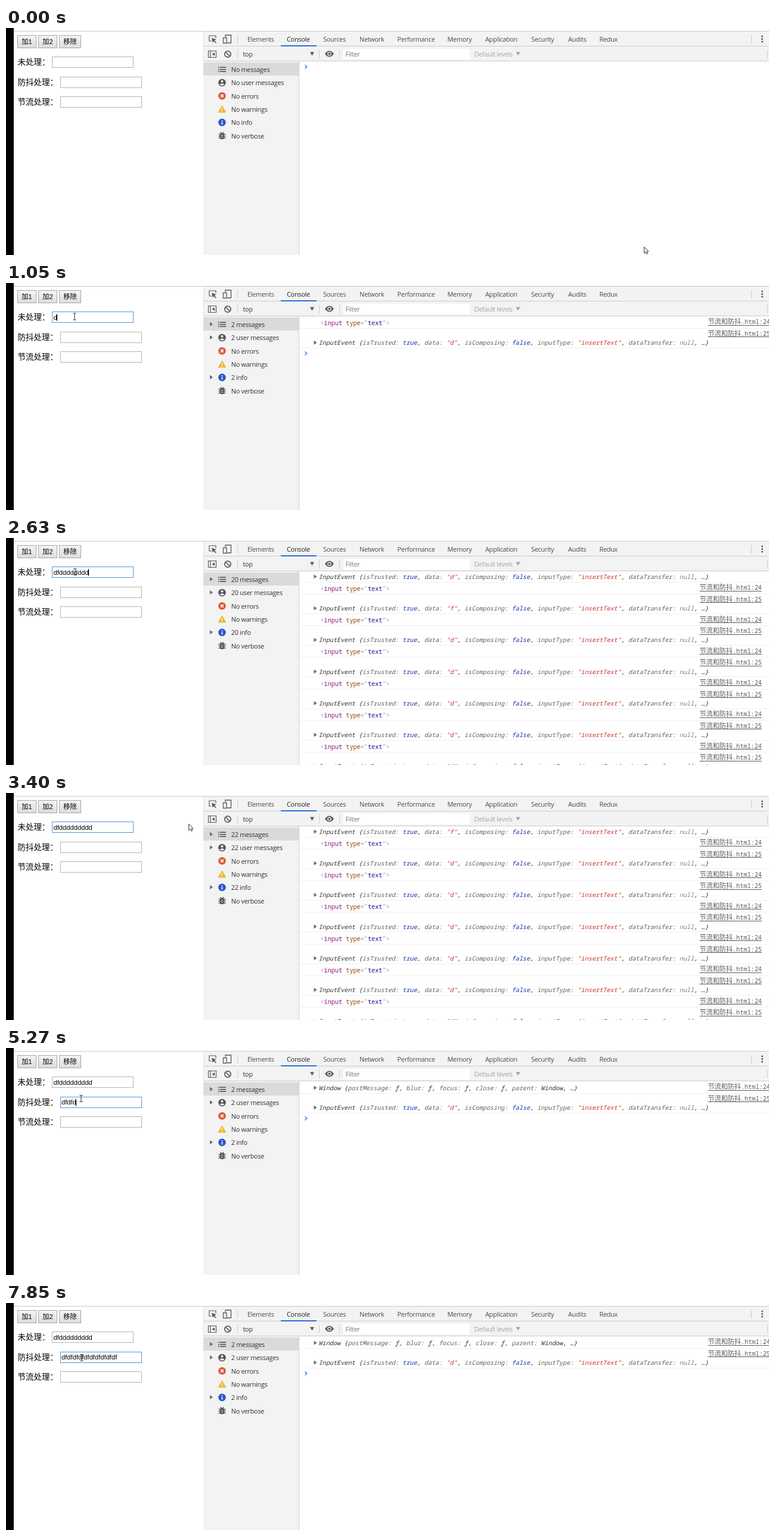
Recreate the animation shown at these times as an HTML page with a canvas. Size 1280x382 px, loop 8 s.

```html
<!DOCTYPE html>
<html lang="zh">
<head>
<meta charset="utf-8">
<style>
  html, body { margin: 0; width: 100%; height: 100%; overflow: hidden; background: #fff; }
  canvas { display: block; }
</style>
</head>
<body>
<canvas id="stage" width="1280" height="382"></canvas>
<script>
const ctx = document.getElementById('stage').getContext('2d');
const LOOP = 8000, PITCH = 53.25;
const UI = '10.9px "Open Sans", "Noto Sans", sans-serif';
const MONO = '10.2px "Noto Sans Mono", monospace';
const HAN = '"Noto Sans CJK SC", "Noto Sans CJK", sans-serif';
const ARIAL = '11.2px "Liberation Sans", ' + HAN;

const TYPED = ['dfddddddddd', 'df'.repeat(10)];
const KEYS = [
  [1040, 1200, 1350, 1520, 1700, 2000, 2300, 2400, 2490, 2590, 2760],
  Array.from({ length: 20 }, (_, i) => 4690 + i * 135)
];
const FOCUS = [[850, 3700], [4540, LOOP]];
const CLEAR = 3700;
const FIELDS = [[77.5, 48.5], [91, 82], [91, 115]];
const MOUSE = [
  [70, 1070, 368], [800, 115, 56.5], [3000, 116, 57], [3600, 372, 50],
  [3945, 372, 50], [4480, 126, 85], [5600, 126, 85], [6200, 127, 92]
];

function rect(x, y, w, h, color) {
  ctx.fillStyle = color;
  ctx.fillRect(x, y, w, h);
}

function frame(x, y, w, h, color) {
  ctx.strokeStyle = color;
  ctx.lineWidth = 1;
  ctx.strokeRect(x, y, w, h);
}

// Draws text and returns the x where it ends.
function text(s, x, y, font = UI, color = '#303030') {
  ctx.font = font;
  ctx.letterSpacing = font === UI ? '-0.27px' : '0px';
  ctx.fillStyle = color;
  ctx.fillText(s, x, y);
  return x + ctx.measureText(s).width;
}

function shape(d, x, y, fill, stroke, width = 1) {
  const path = new Path2D(d);
  ctx.save();
  ctx.translate(x, y);
  if (fill) { ctx.fillStyle = fill; ctx.fill(path); }
  if (stroke) { ctx.strokeStyle = stroke; ctx.lineWidth = width; ctx.stroke(path); }
  ctx.restore();
}

function disc(x, y, r, color) {
  ctx.fillStyle = color;
  ctx.beginPath();
  ctx.arc(x, y, r, 0, Math.PI * 2);
  ctx.fill();
}

const rightArrow = (x, y) => shape('M0-3.5L5.2 0L0 3.5Z', x, y, '#6e6e6e');
const downArrow = (x, y, color) => shape('M0 0H7L3.5 6Z', x, y, color);

function mouseAt(t) {
  const next = MOUSE.findIndex(k => k[0] > t);
  if (next === 0) return MOUSE[0].slice(1);
  if (next < 0) return MOUSE.at(-1).slice(1);
  const [t0, x0, y0] = MOUSE[next - 1], [t1, x1, y1] = MOUSE[next];
  const u = (t - t0) / (t1 - t0), s = u * u * (3 - 2 * u);
  return [x0 + (x1 - x0) * s, y0 + (y1 - y0) * s];
}

function drawPage(t, counts) {
  rect(0, 0, 1280, 382, '#fff');
  rect(13, 5, 1267, 1, '#cbcbcb');
  rect(0, 0, 13, 382, '#000');

  [['加1', 19.5, 31], ['加2', 54.5, 31], ['移除', 89.5, 36]].forEach(([label, x, w]) => {
    const shade = ctx.createLinearGradient(0, 12, 0, 34);
    shade.addColorStop(0, '#f5f5f5');
    shade.addColorStop(1, '#dcdcdc');
    rect(x, 12.5, w, 21, shade);
    frame(x, 12.5, w, 21, '#a8a8a8');
    ctx.textAlign = 'center';
    text(label, x + w / 2, 27.3, ARIAL, '#000');
    ctx.textAlign = 'left';
  });

  ['未处理：', '防抖处理：', '节流处理：'].forEach((label, i) => {
    const [x, y] = FIELDS[i];
    text(label, 19.5, y + 13.5, '13.5px ' + HAN, '#000');
    const focused = i < 2 && t >= FOCUS[i][0] && t < FOCUS[i][1];
    frame(Math.floor(x) + .5, Math.floor(y) + .5, 136, 18, focused ? '#5692e4' : '#b4b4b4');
    if (i > 1) return;
    const end = text(TYPED[i].slice(0, counts[i]), x + 2, y + 13, ARIAL, '#000');
    const lastKey = counts[i] ? KEYS[i][counts[i] - 1] : FOCUS[i][0];
    if (focused && (t - lastKey) % 1100 < 560) rect(Math.floor(end), Math.floor(y) + 4, 1, 12, '#000');
  });
}

function drawToolbars(t) {
  const icon = '#5a5a5a', line = '#cccccc';
  rect(331, 6, 949, 50, '#f3f3f3');
  rect(331, 30, 949, 1, line);
  rect(331, 55, 949, 1, line);
  rect(331, 6, 1, 376, '#e2e2e2');

  shape('M4.5 9.5H.5V.5H11.5V4.5', 340.5, 12.5, null, icon, 1.2);
  shape('M4.5 4.5L12.5 7.5L9.2 9L12.5 12.4L11.2 13.4L8 10.2L6.3 12.8Z', 340.5, 12, icon);
  shape('M3 3.5V.5H12.5V13.5H6', 365, 11.5, null, icon, 1.3);
  shape('M.5 5H6V14H.5Z', 364, 11.5, '#f3f3f3', icon, 1.3);

  const tabs = { Elements: 405, Console: 471, Sources: 532, Network: 593, Performance: 656.5,
    Memory: 740.5, Application: 804, Security: 881, Audits: 943, Redux: 995.5 };
  for (const name in tabs) text(name, tabs[name], 23, UI, name === 'Console' ? '#222' : '#4a4a4a');
  rect(461, 29, 60, 2, '#2a70d8');
  [[388, 12], [1250, 12], [388, 37], [525, 37], [559, 37], [1277, 37]].forEach(([x, y]) => rect(x, y, 1, 14, line));
  [14, 18.5, 23].forEach(y => disc(1268.5, y, 1.5, icon));

  shape('M0 0H13V11H0ZM3.5 0V11', 339.5, 38.5, null, icon, 1.2);
  shape('M10.5 2.5V8.5L6 5.5Z', 339.5, 38.5, icon);
  const clearColor = t > 3500 && t < 4060 ? '#222' : icon;
  shape('M5.2 0A5.2 5.2 0 1 1-5.2 0A5.2 5.2 0 1 1 5.2 0M-3.7-3.7L3.7 3.7', 372, 44, null, clearColor, 1.7);
  text('top', 397.5, 48);
  downArrow(510, 40.5, icon);
  shape('M-7.5 0Q-4-5 0-5T7.5 0Q4 5 0 5T-7.5 0Z', 542.5, 43.5, icon);
  disc(542.5, 43.5, 3.3, '#f3f3f3');
  disc(542.5, 43.5, 2, icon);
  rect(566, 35, 212, 18, '#fff');
  text('Filter', 569.5, 48, UI, '#757575');
  text('Default levels', 785.5, 47.5, UI, '#a5a5a5');
  downArrow(855.5, 40.5, '#a0a0a0');
}

const ICONS = [
  (x, y) => [-3.5, 0, 3.5].forEach(d => {
    rect(x - 6.5, y + d - .8, 2, 1.6, '#555');
    rect(x - 3.5, y + d - .8, 10, 1.6, '#555');
  }),
  (x, y) => {
    disc(x, y, 6.3, '#555');
    disc(x, y - 2.3, 2, '#f3f3f3');
    shape('M-4 3.2Q0-.6 4 3.2Q0 6.4-4 3.2Z', x, y, '#f3f3f3');
  },
  (x, y) => {
    disc(x, y, 6.3, '#dc5a3c');
    shape('M-2.4-2.4L2.4 2.4M2.4-2.4L-2.4 2.4', x, y, null, '#fff', 1.5);
  },
  (x, y) => {
    shape('M0-5.8L6.5 5.5H-6.5Z', x, y, '#eeb53c', '#eeb53c', .8);
    rect(x - .7, y - 2, 1.4, 3.8, '#fff');
    rect(x - .7, y + 2.7, 1.4, 1.4, '#fff');
  },
  (x, y) => {
    disc(x, y, 6.3, '#2856cc');
    rect(x - .8, y - 3.6, 1.7, 1.7, '#fff');
    rect(x - .8, y - .9, 1.7, 4.6, '#fff');
  },
  (x, y) => {
    shape('M-6-2.4H6M-6 .8H6M-6 4H6M-3-6L-1-4M3-6L1-4', x, y, null, '#555', 1.4);
    shape('M-3.6-1A3.6 3.6 0 0 1 3.6-1V2.5A3.6 3.6 0 0 1-3.6 2.5Z', x, y, '#555');
    rect(x - 1.3, y - 1.2, 2.6, 1.2, '#f3f3f3');
    rect(x - 1.3, y + 1.8, 2.6, 1.2, '#f3f3f3');
  }
];

function drawSidebar(messages) {
  rect(331, 56, 161, 326, '#f3f3f3');
  rect(331, 58, 161, 22, '#dadada');
  rect(491, 56, 1, 326, '#cdcdcd');
  ['messages', 'user messages', 'errors', 'warnings', 'info', 'verbose'].forEach((kind, i) => {
    const y = 69.7 + i * 22.3;
    const counted = messages && [0, 1, 4].includes(i);
    ICONS[i](362.5, y);
    text(`${counted ? messages : 'No'} ${kind}`, 377.7, y + 4.3);
    if (counted) rightArrow(342, y - .5);
  });
}

const DARK = '#303030', KEY = '#606060', BLUE = '#1c2fb0', RED = '#c8322c', GREY = '#808080';

function spans(parts, x, y, font = 'italic ' + MONO) {
  for (const [s, color] of parts) x = text(s, x, y, font, color);
}

// "key: value" previews inside an object summary
function preview(name, props, y) {
  rightArrow(516.5, y - 4);
  const parts = [[name + ' {', DARK]];
  props.forEach(([key, value, color]) => parts.push([key, KEY], [': ', KEY], [value, color], [', ', DARK]));
  spans([...parts, ['…}', DARK]], 524.5, y);
}

const inputEvent = (char, y) => preview('InputEvent', [
  ['isTrusted', 'true', BLUE], ['data', `"${char}"`, RED], ['isComposing', 'false', BLUE],
  ['inputType', '"insertText"', RED], ['dataTransfer', 'null', GREY]
], y);

const windowObject = y => preview('Window', [
  ...['postMessage', 'blur', 'focus', 'close'].map(key => [key, 'ƒ', DARK]), ['parent', 'Window', DARK]
], y);

const inputTag = y => spans([
  ['<', '#a894a6'], ['input', '#881280'], [' type', '#994500'], ['="', '#a894a6'],
  ['text', '#1a1aa6'], ['"', '#a894a6'], ['>', '#a894a6']
], 527.5, y, MONO);

function link(line, x, y) {
  const mid = text('节流和防抖', x, y, '11.1px ' + HAN, '#5a5a5a');
  const end = text('.html:' + line, mid, y, MONO, '#5a5a5a');
  rect(x, Math.round(y + 1.3), end - x, 1, '#5a5a5a');
}

function drawConsole(chars, firstRow) {
  const pairs = chars.length;
  const scroll = pairs > 9 ? (pairs - 10) * PITCH + 35.3 : 0;
  const linkX = scroll ? 1163.5 : 1177.5;
  ctx.save();
  ctx.beginPath();
  ctx.rect(492, 56, 788, 326);
  ctx.clip();
  for (let i = 0; i < pairs; i++) {
    const y = i * PITCH - scroll;
    firstRow(y + 71);
    link(24, linkX, y + 69.4);
    link(25, linkX, y + 89);
    inputEvent(chars[i], y + 104.2);
    rect(492, Math.round(y + 76), 788, 1, '#f0f0f0');
    rect(492, Math.round(y + 109), 788, 1, '#f0f0f0');
  }
  shape('M0-3L3.2 0L0 3', 501.5, 65.3 + pairs * PITCH - scroll, null, '#2f7be0', 1.5);
  ctx.restore();
}

function drawMouse(t) {
  const [x, y] = mouseAt(t);
  const overField = FIELDS.some(([fx, fy]) => x > fx && x < fx + 136 && y > fy && y < fy + 19);
  if (overField) shape('M-2.5-5.5H-.8L0-5L.8-5.5H2.5M0-5V5M-2.5 5.5H-.8L0 5L.8 5.5H2.5', x, y, null, '#222', 1);
  else shape('M.5.5V11L3 8.8L4.8 12.4L6.6 11.6L4.9 8.1H8Z', x, y, '#fff', '#333', 1);
}

function draw() {
  const t = performance.now() % LOOP;
  const counts = KEYS.map(times => times.filter(k => k <= t).length);
  const debounced = counts[1] > 0;
  const logged = debounced ? 'd' : t < CLEAR ? TYPED[0].slice(0, counts[0]) : '';
  drawPage(t, counts);
  drawToolbars(t);
  drawSidebar(logged.length * 2);
  drawConsole(logged, debounced ? windowObject : inputTag);
  drawMouse(t);
  requestAnimationFrame(draw);
}
draw();
</script>
</body>
</html>
```
